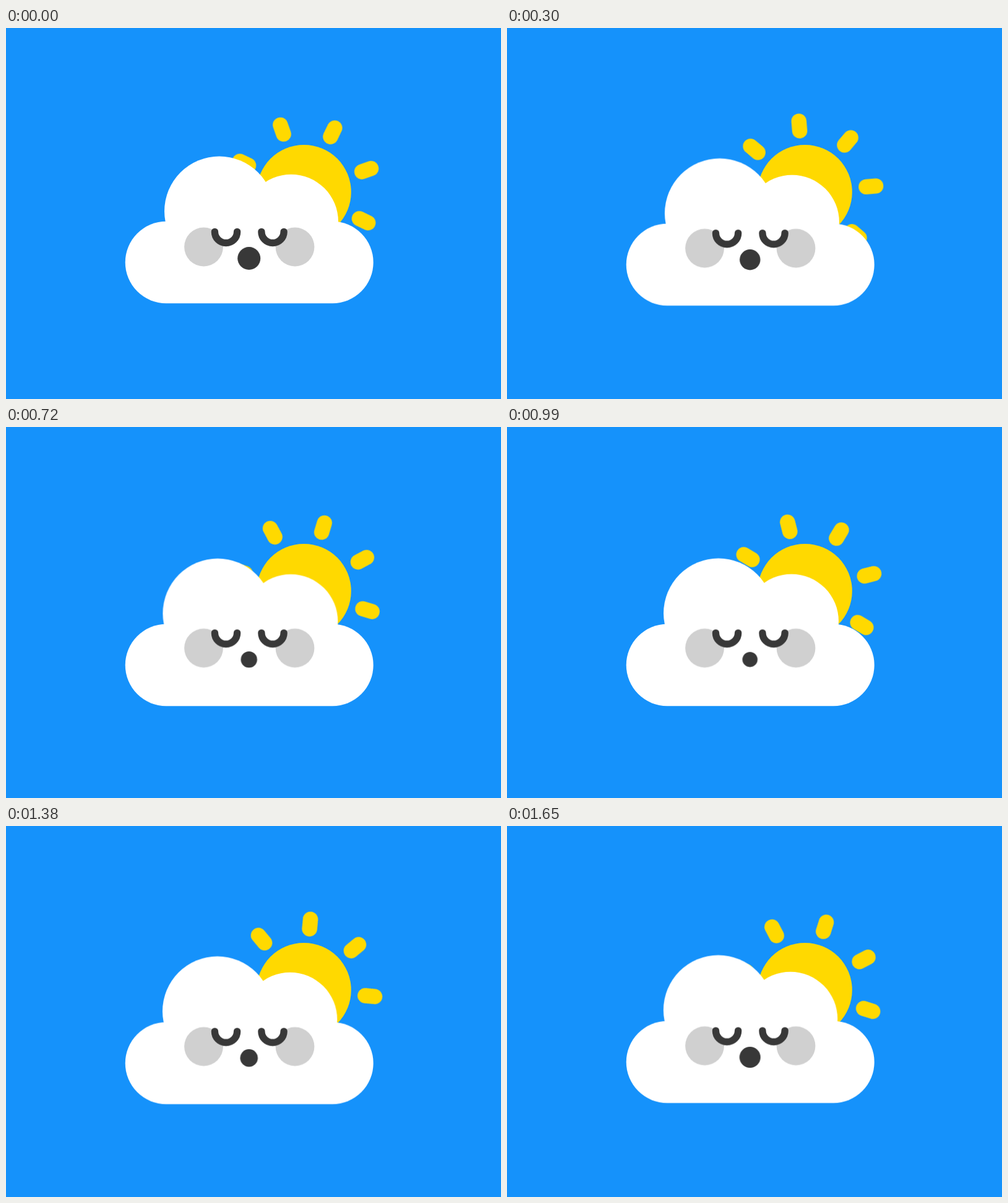
Write an HTML page without scripts that moves like this. It is 800 px wide and 600 px high and loops after 1680 ms.

```html
<!DOCTYPE html>
<html lang="en">
<head>
<meta charset="utf-8">
<title>Sleepy cloud</title>
<style>
  html, body { margin: 0; width: 100%; height: 100%; overflow: hidden; background: #1592fb; }
  svg { display: block; width: 100%; height: 100%; }

  .rays, .cloud, .big, .small, .face, .mouth { animation: 1680ms linear infinite; }

  .rays {
    stroke: #ffd900; stroke-width: 24.5; stroke-linecap: round;
    animation-name: spin;
    animation-timing-function: cubic-bezier(.333, .31, .667, .717);
  }
  .cloud { --drop: 6.1px; --rest: 2.5px; animation-name: bob; }
  .face  { --drop: 3.6px; --rest: 1.4px; animation-name: bob; }
  .big   { animation-name: drift-big; }
  .small { animation-name: drift-small; }
  .mouth { animation-name: breathe; transform-box: fill-box; transform-origin: center; }

  @keyframes spin {
    from { transform: rotate(-19.4deg); }
    to   { transform: rotate(63.7deg); }
  }
  @keyframes bob {
    0%    { transform: translateY(0); animation-timing-function: cubic-bezier(.333, .69, .667, 1); }
    48.8% { transform: translateY(var(--drop)); animation-timing-function: cubic-bezier(.333, 0, .667, .333); }
    100%  { transform: translateY(var(--rest)); }
  }
  /* puffs drift relative to the cloud base */
  @keyframes drift-big {
    0%   { transform: translate(0, 0); }
    32%  { transform: translate(-2px, -.6px); }
    43%  { transform: translate(-2.6px, -.8px); }
    59%  { transform: translate(-3px, -1.1px); }
    100% { transform: translate(-3.2px, -1.4px); }
  }
  @keyframes drift-small {
    0%   { transform: translate(0, 0); }
    18%  { transform: translate(-.1px, -2.8px); }
    32%  { transform: translate(-.5px, -4.2px); }
    50%  { transform: translate(-.8px, -4.9px); }
    82%  { transform: translate(-1.7px, -4.6px); }
    100% { transform: translate(-2.9px, -3.6px); }
  }
  @keyframes breathe {
    0%    { transform: scale(1); animation-timing-function: cubic-bezier(.333, .15, .667, .8); }
    53.6% { transform: scale(.654); animation-timing-function: cubic-bezier(.333, .02, .667, .38); }
    100%  { transform: scale(.938); }
  }
</style>
</head>
<body>
<svg viewBox="0 0 800 600">
  <defs>
    <path id="ray" d="M0-99.3V-115"/>
    <g id="pair"><use href="#ray"/><use href="#ray" transform="rotate(180)"/></g>
    <path id="eye" d="M-18.1 0a18.1 18.1 0 0 0 36.2 0"/>
  </defs>

  <g transform="translate(481.5 265.3)">
    <circle r="76.3" fill="#ffd900"/>
    <g class="rays">
      <use href="#pair"/>
      <use href="#pair" transform="rotate(45)"/>
      <use href="#pair" transform="rotate(90)"/>
      <use href="#pair" transform="rotate(135)"/>
    </g>
  </g>

  <g class="cloud" fill="#fff">
    <rect x="192.7" y="312.8" width="401" height="132.4" rx="66.2"/>
    <circle class="big" cx="344.7" cy="296.2" r="88.7"/>
    <circle class="small" cx="460.8" cy="313" r="76.2"/>
  </g>

  <g class="face" fill="#383838">
    <g fill="#d0d0d0">
      <circle cx="319.5" cy="354" r="31.4"/>
      <circle cx="467" cy="354" r="31.4"/>
    </g>
    <g fill="none" stroke="#383838" stroke-width="11.4" stroke-linecap="round">
      <use href="#eye" x="355.5" y="329.4"/>
      <use href="#eye" x="431" y="329.4"/>
    </g>
    <circle class="mouth" cx="392.7" cy="372.5" r="18.5"/>
  </g>
</svg>
</body>
</html>
```
